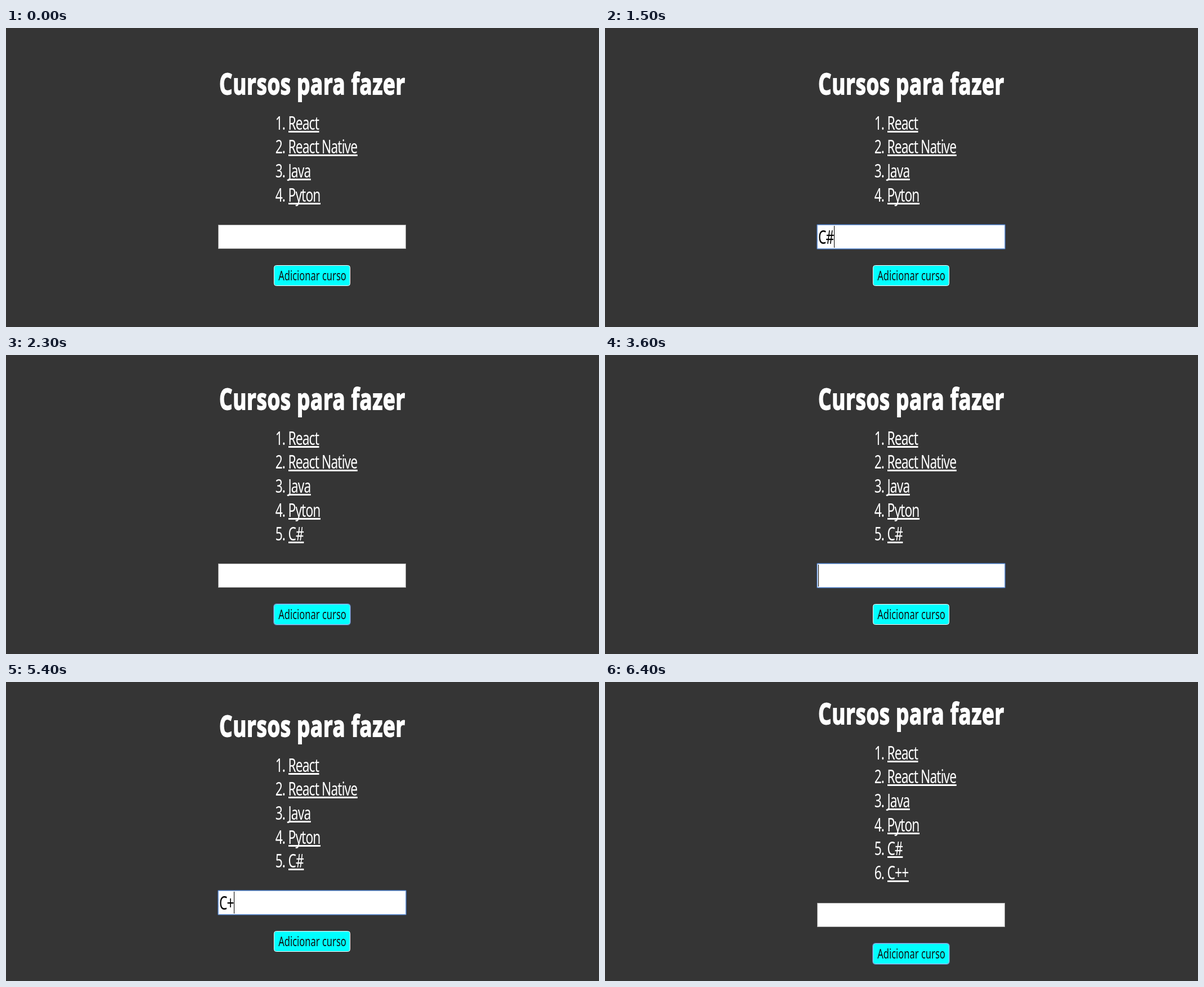
An HTML page for the animation above (8000 ms loop, 1054 by 532 pixels).

```html
<!DOCTYPE html>
<html lang="pt-BR">
<head>
<meta charset="utf-8">
<title>Cursos para fazer</title>
<style>
  html, body { margin: 0; width: 100%; height: 100%; overflow: hidden; background: #353535; }
  svg { display: block; width: 1054px; height: 532px; }
  text { font-family: "Noto Sans", "Open Sans", sans-serif; fill: #fff; }
  .title { font-size: 52.5px; font-weight: 700; letter-spacing: 1px; text-anchor: middle; stroke: #fff; stroke-width: 2px; }
  .item, .typed { font-size: 32.6px; letter-spacing: -1.3px; }
  .item { font-weight: 300; }
  .num { text-anchor: end; }
  .typed { fill: #000; }
  .label { font-size: 23.6px; fill: #111; text-anchor: middle; }
</style>
</head>
<body>
<svg viewBox="0 0 1054 532">
  <g id="top"></g>
  <g id="form">
    <rect id="fieldRing" x="376.5" y="349.5" width="335" height="44" rx="1" fill="none" stroke="#46689c"/>
    <rect id="field" x="377.5" y="350.5" width="333" height="42" fill="#fff"/>
    <rect id="caret" y="352" width="1" height="39"/>
    <rect id="buttonRing" x="475.5" y="421.5" width="137" height="38" rx="4.5" fill="none" stroke="#46689c"/>
    <rect id="button" x="476.5" y="422.5" width="135" height="36" rx="4" fill="#0ff"/>
  </g>
</svg>
<script>
const LOOP = 8000, PITCH = 42.667;
const CONDENSE = 0.7; // one narrow cut of the typeface for all text
const courses = ["React", "React Native", "Java", "Pyton", "C#", "C++"];

// [start ms, extra items, typed text, caret x (0 = hidden), focus]
const steps = [
  [0, 0, "", 0, ""],
  [500, 0, "", 379, "field"],
  [900, 0, "", 0, "field"],
  [1000, 0, "C", 393, "field"],
  [1500, 0, "C#", 407, "field"],
  [2000, 0, "C#", 0, "field"],
  [2100, 0, "C#", 0, "button"],
  [2300, 1, "", 0, "button"],
  [3600, 1, "", 379, "field"],
  [4100, 1, "", 0, "field"],
  [4400, 1, "C", 393, "field"],
  [4900, 1, "C", 0, "field"],
  [5400, 1, "C+", 405, "field"],
  [5600, 1, "C++", 417, "field"],
  [6100, 1, "C++", 0, "button"],
  [6400, 2, "", 0, "button"],
];

const $ = id => document.getElementById(id);
const add = (parent, tag, attrs) => {
  const el = document.createElementNS("http://www.w3.org/2000/svg", tag);
  for (const k in attrs) el.setAttribute(k, attrs[k]);
  return parent.appendChild(el);
};
const addText = (parent, style, x, y, text) => {
  const el = add(parent, "text", { class: style, transform: `translate(${x} ${y}) scale(${CONDENSE} 1)` });
  el.textContent = text;
  return el;
};
const setVisible = (el, on) => el.setAttribute("visibility", on ? "visible" : "hidden");

addText($("top"), "title", 544.5, 118, "Cursos para fazer");
addText($("form"), "label", 544.5, 449, "Adicionar curso");
const typed = addText($("form"), "typed", 379, 384, "");

const rows = courses.map((name, i) => {
  const y = Math.round(180.5 + i * PITCH);
  const row = add($("top"), "g", {});
  addText(row, "item num", 496, y, i + 1 + ".");
  const link = addText(row, "item", 501.5, y, name);
  const width = link.getComputedTextLength() * CONDENSE;
  add(row, "rect", { x: 502, y: y + 2, width, height: 3, fill: "#fff" });
  return row;
});

let shown;
function show(step) {
  if (step === shown) return;
  shown = step;
  const [, extra, text, caret, focus] = step;
  const shift = Math.round(extra * PITCH / 2);
  $("top").setAttribute("transform", `translate(0 ${-shift})`);
  $("form").setAttribute("transform", `translate(0 ${shift})`);
  rows.forEach((row, i) => setVisible(row, i < 4 + extra));
  typed.textContent = text;
  $("caret").setAttribute("x", caret);
  setVisible($("caret"), caret);
  setVisible($("fieldRing"), focus === "field");
  setVisible($("buttonRing"), focus === "button");
  $("field").setAttribute("stroke", focus === "field" ? "#7ba3dc" : "#a9a9a9");
  $("button").setAttribute("stroke", focus === "button" ? "#a8c8f0" : "#fff");
}

const t0 = performance.now();
function tick() {
  const t = (performance.now() - t0) % LOOP;
  show(steps.findLast(s => s[0] <= t));
  requestAnimationFrame(tick);
}
tick();
</script>
</body>
</html>
```
